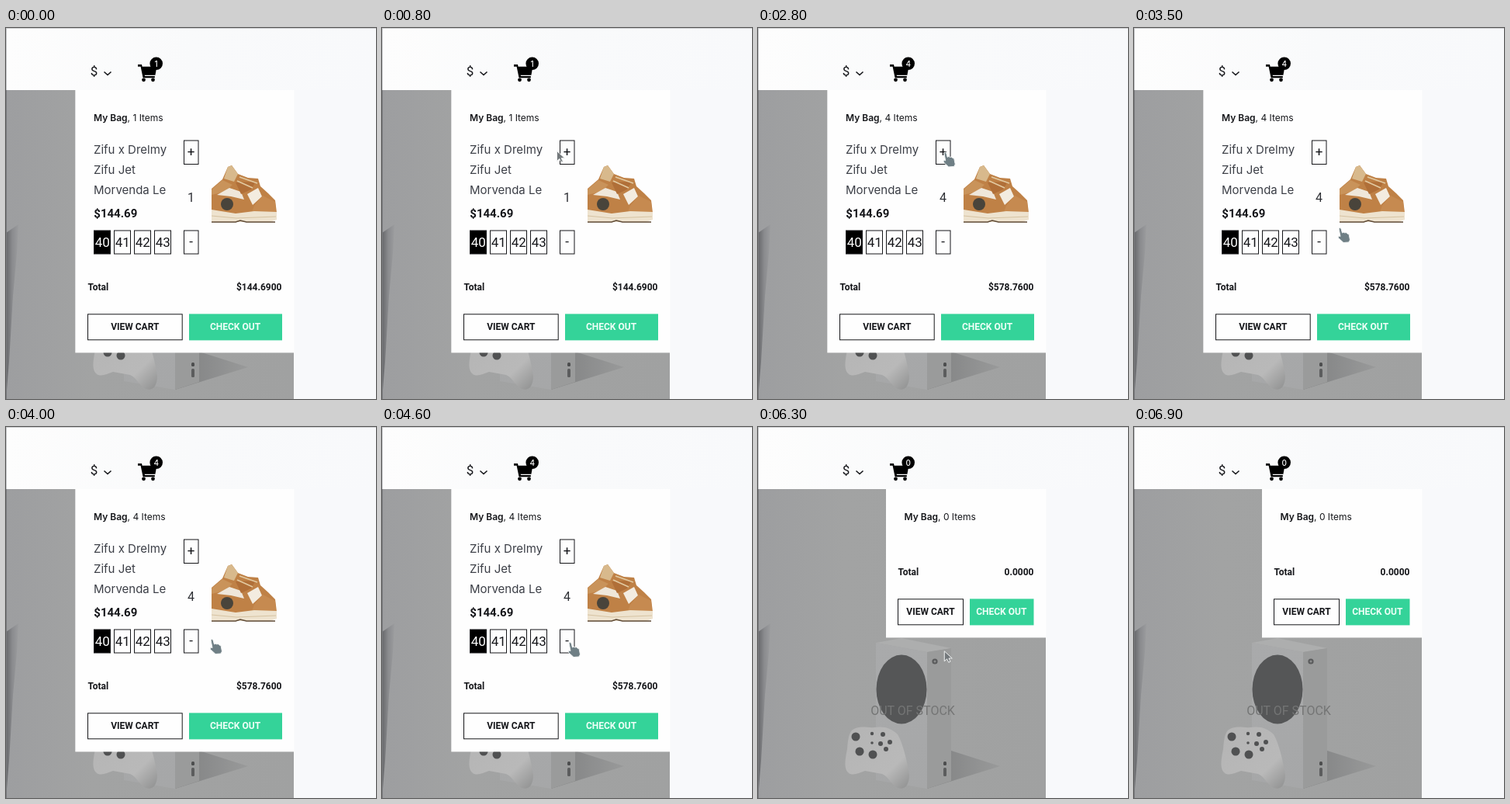
These frames come from a looping animation (477 by 478 pixels, 7300 ms). An HTML page:

```html
<!DOCTYPE html>
<html lang="en">
<head>
<meta charset="utf-8">
<title>Shopping bag</title>
<style>
  html, body { margin: 0; width: 100%; height: 100%; overflow: hidden; background: #fafbfc; }
  svg { display: block; width: 100%; height: 100%; }
  text { font-family: Roboto, sans-serif; fill: #15161a; }
  .geo { font-family: Inter, sans-serif; }
  .name { font-size: 15px; fill: #3b3e46; }
  .bold { font-size: 12px; font-weight: 700; }
  .mid { text-anchor: middle; }
  .end { text-anchor: end; }
  .num { font-size: 17px; text-anchor: middle; }
  .box { fill: #fefefe; stroke: #16171a; stroke-width: 1; }
</style>
</head>
<body>
<svg viewBox="0 0 477 478">
  <defs>
    <linearGradient id="page"><stop offset="0" stop-color="#fdfdfd"/><stop offset=".5" stop-color="#f9fafb"/><stop offset="1" stop-color="#f8f9fb"/></linearGradient>
    <linearGradient id="wall"><stop offset="0" stop-color="#9d9ea0"/><stop offset=".3" stop-color="#a2a3a3"/><stop offset="1" stop-color="#a0a1a1"/></linearGradient>
    <linearGradient id="fade" x2="0" y2="1"><stop offset="0" stop-color="#a9aaab"/><stop offset="1" stop-color="#a6a7a8"/></linearGradient>
    <linearGradient id="shade"><stop offset="0" stop-color="#7f8081"/><stop offset="1" stop-color="#999a9a"/></linearGradient>
    <linearGradient id="edge"><stop offset="0" stop-color="#66676a"/><stop offset=".5" stop-color="#8a8b8e"/><stop offset="1" stop-color="#9b9c9e"/></linearGradient>
    <linearGradient id="shell" y2="1"><stop offset="0" stop-color="#b4b4b4"/><stop offset=".7" stop-color="#b9b9b9"/><stop offset="1" stop-color="#8f9090"/></linearGradient>
  </defs>

  <rect width="477" height="478" fill="url(#page)"/>
  <rect x="371" y="80" width="106" height="398" fill="#f8f9fb"/>
  <rect width="477" height="1" fill="#cfd0d2"/>
  <rect width="1" height="80" fill="#c4c5c7"/>

  <!-- dimmed product photo -->
  <rect y="80" width="371" height="398" fill="url(#wall)"/>
  <path d="M0 264L16 253L14 290L9 345L4 430L0 478Z" fill="url(#edge)"/>
  <rect y="80" width="1" height="398" fill="#77787b"/>
  <path d="M249 417L312 437L218 466Z" fill="url(#shade)"/>
  <path d="M152 278L185 272L249 285L218 290Z" fill="#adaeae"/>
  <path d="M152 278L218 290V466L152 455Z" fill="url(#fade)"/>
  <path d="M218 290L249 285V456L218 466Z" fill="#9a9b9b"/>
  <ellipse cx="185" cy="338" rx="32.5" ry="44.5" fill="#555657"/>
  <circle cx="228" cy="302" r="3.6" fill="#5a5b5c"/>
  <circle cx="228" cy="302" r="1.5" fill="#8c8d8d"/>
  <rect x="239" y="431" width="4" height="5" rx="1.5" fill="#4c4d4e"/>
  <rect x="239" y="439" width="4" height="11" rx="1.5" fill="#5c5d5e"/>
  <path d="M122 390C132 384 140 388 150 387C162 385 172 388 180 396C187 408 192 430 195 448C195 463 188 468 180 465C172 461 168 450 160 447L138 443C131 445 125 449 119 447C110 443 112 430 115 415C116 403 117 394 122 390Z" fill="url(#shell)"/>
  <g fill="#505152">
    <circle cx="126" cy="399" r="5.500"/><circle cx="131" cy="418" r="5.500"/><circle cx="148" cy="422" r="5.500"/>
    <circle cx="161" cy="396" r="3"/><circle cx="158" cy="408" r="3"/><circle cx="170" cy="406" r="3"/>
    <circle cx="165" cy="415" r="3"/><circle cx="147" cy="395" r="2.200"/><circle cx="147" cy="407" r="1.800"/>
  </g>
  <text x="199.500" y="371" class="mid" font-size="16" style="fill:#747575">OUT OF STOCK</text>

  <!-- header -->
  <text x="108.800" y="61" font-size="17">$</text>
  <path d="M126.500 56.500L131 60.500L135.500 56.500" fill="none" stroke="#15161a" stroke-width="1.600"/>
  <path d="M170 47H175L175.600 49.800H194.400L192.400 60.700H178.700L179 62H191.800V64.200H176.600L173.600 49.700H170Z"/>
  <circle cx="177.500" cy="66.800" r="2.400"/>
  <circle cx="189.500" cy="66.800" r="2.400"/>
  <circle cx="193.700" cy="45.800" r="8.300"/>
  <text id="badge" x="193.700" y="49.500" class="geo mid" font-size="10" font-weight="500" style="fill:#fff"></text>

  <rect id="panel" y="80" fill="#fefefe"/>
  <text id="heading" y="120" class="geo" font-size="12"><tspan font-weight="600">My Bag</tspan><tspan id="items"></tspan></text>

  <g id="product">
    <text x="113" y="162" class="geo name">Zifu x Drelmy</text>
    <text x="113" y="188" class="geo name">Zifu Jet</text>
    <text x="113" y="214" class="geo name">Morvenda Le</text>
    <text x="113.300" y="244" font-size="15" font-weight="600">$144.69</text>
    <g id="sizes"></g>
    <rect x="229.500" y="145" width="18.500" height="30.500" class="box"/>
    <text x="238.700" y="165" class="num">+</text>
    <text id="qty" x="238.500" y="223.500" class="num" style="font-size:16px;fill:#2c2e33"></text>
    <rect x="229.500" y="261" width="18.500" height="30" class="box"/>
    <rect id="mark" x="236" y="262" width="5.500" height="25" fill="#2b9aa3"/>
    <text x="238.700" y="281" class="num">-</text>
    <!-- shoe -->
    <path d="M265 207L279 195L286 179L291 177L299 188L312 193L325 194L328 204L338 213L347 222L349 238L265 240Z" fill="#bf8146"/>
    <path d="M281 194L286 179L291 177L299 188L294 198Z" fill="#d8b98c"/>
    <path d="M265 208L279 196L292 202L282 211L265 215Z" fill="#c9935a"/>
    <path d="M272 215L288 206L303 211L307 221L290 217Z" fill="#efe7da"/>
    <path d="M296 199L322 198L316 208L303 214Z" fill="#b06f38"/>
    <path d="M301 192L324 200M298 197L318 206" stroke="#e2c9a0" stroke-width="1.800"/>
    <path d="M311 214L325 206L330 217L318 228Z" fill="#f3ece0"/>
    <path d="M320 229L331 216L347 224L348 237H317Z" fill="#c68a50"/>
    <circle cx="285" cy="227" r="8" fill="#49443b"/>
    <path d="M265 234L296 239L320 236L349 237V247L340 250H265Z" fill="#eee3cf"/>
    <path d="M265 242L297 245L348 243" fill="none" stroke="#d6c3a2"/>
    <path d="M265 250H296L302 248L310 250H347" fill="none" stroke="#5f4a35" stroke-width="1.500"/>
  </g>

  <g id="footer">
    <text id="label" class="bold">Total</text>
    <text id="total" x="355.500" class="bold end"></text>
    <rect id="view" class="box" height="33"/>
    <text id="viewText" class="bold mid">VIEW CART</text>
    <rect id="pay" height="34" fill="#34d399"/>
    <text id="payText" class="bold mid" style="fill:#eefff7">CHECK OUT</text>
  </g>

  <path id="arrow" d="M0 0V13L3.300 10L5.500 14.500L7.800 13.400L5.700 9.200H10Z" fill="#73787b" stroke="#f0f2f2" stroke-width="1"/>
  <path id="hand" d="M2 1.500Q3.500 -.500 5 1.500L6.500 7L8 6L10 7L11.500 6.500L13 8L15 8.500L16.500 16L15 19L8 19.500L1.500 13.500Q.5 11 3 11L4 11.500Z" fill="#6f7f85" stroke="#f3f5f5" stroke-width="1"/>
</svg>
<script>
const LOOP = 7300, STEP = 100, PRICE = 144.69;
const $ = id => document.getElementById(id);
const set = (id, attrs) => {
  for (const k in attrs) $(id).setAttribute(k, attrs[k]);
};
const show = (id, on) => set(id, { visibility: on ? 'visible' : 'hidden' });

// time, quantity
const counts = [[0, 1], [1600, 2], [2100, 3], [2300, 4], [5200, 3], [5600, 2], [5800, 1], [6300, 0]];
// time, x, y of the pointer
const path = [
  [300, 150, 490], [800, 225.5, 158.5], [1100, 237, 158], [2600, 237, 158], [2900, 238, 160],
  [3200, 238, 160], [3500, 262, 257], [4000, 262, 273], [4600, 239, 277], [6200, 239, 277], [6900, 262, 490]
];

const full = { left: 89.3, bottom: 418.4, head: 113, label: 105.5, base: 338, btn: 368.4, viewW: 121.7, pay: 236, payW: 120 };
const empty = { left: 165, bottom: 271.4, head: 188.5, label: 180.5, base: 191, btn: 221.4, viewW: 84, pay: 273, payW: 82.5 };

$('sizes').innerHTML = [40, 41, 42, 43].map((size, i) => {
  const x = 113.5 + 26 * i, on = i === 0;
  return `<rect x="${x}" y="261" width="21" height="30" class="box"${on ? ' style="fill:#000"' : ''}/>` +
    `<text x="${x + 10.8}" y="281.5" class="num"${on ? ' style="fill:#fff"' : ''}>${size}</text>`;
}).join('');

function pointerAt(t) {
  const i = path.findIndex(p => p[0] >= t);
  if (i < 1) return [0, 500];
  const [t0, x0, y0] = path[i - 1], [t1, x1, y1] = path[i];
  const u = (t - t0) / (t1 - t0), e = u * u * (3 - 2 * u);
  return [x0 + (x1 - x0) * e, y0 + (y1 - y0) * e];
}

function layout(o) {
  set('panel', { x: o.left, width: 371.5 - o.left, height: o.bottom - 80 });
  set('heading', { x: o.head });
  set('label', { x: o.label, y: o.base });
  set('total', { y: o.base });
  set('view', { x: o.label, y: o.btn + 0.4, width: o.viewW });
  set('viewText', { x: o.label + o.viewW / 2, y: o.btn + 21 });
  set('pay', { x: o.pay, y: o.btn, width: o.payW });
  set('payText', { x: o.pay + o.payW / 2 - 0.5, y: o.btn + 21 });
}

function draw(time) {
  const t = Math.floor((time % LOOP) / STEP) * STEP;
  const n = counts.filter(c => c[0] <= t).pop()[1];
  layout(n ? full : empty);
  set('product', { display: n ? 'inline' : 'none' });
  $('badge').textContent = $('qty').textContent = n;
  $('items').textContent = `, ${n} Items`;
  $('total').textContent = n ? `$${(PRICE * n).toFixed(2)}00` : '0.0000';
  set('mark', { display: t >= 5800 && t < 6300 ? 'inline' : 'none' });

  const [x, y] = pointerAt(t);
  const hand = t >= 1000 && t < 6300;
  const visible = t >= 400 && t < 6900;
  const at = { transform: `translate(${x} ${y})` };
  set('hand', at);
  set('arrow', at);
  show('hand', visible && hand);
  show('arrow', visible && !hand);
}

const start = performance.now();
function tick() {
  draw(performance.now() - start);
  requestAnimationFrame(tick);
}
tick();
</script>
</body>
</html>
```
